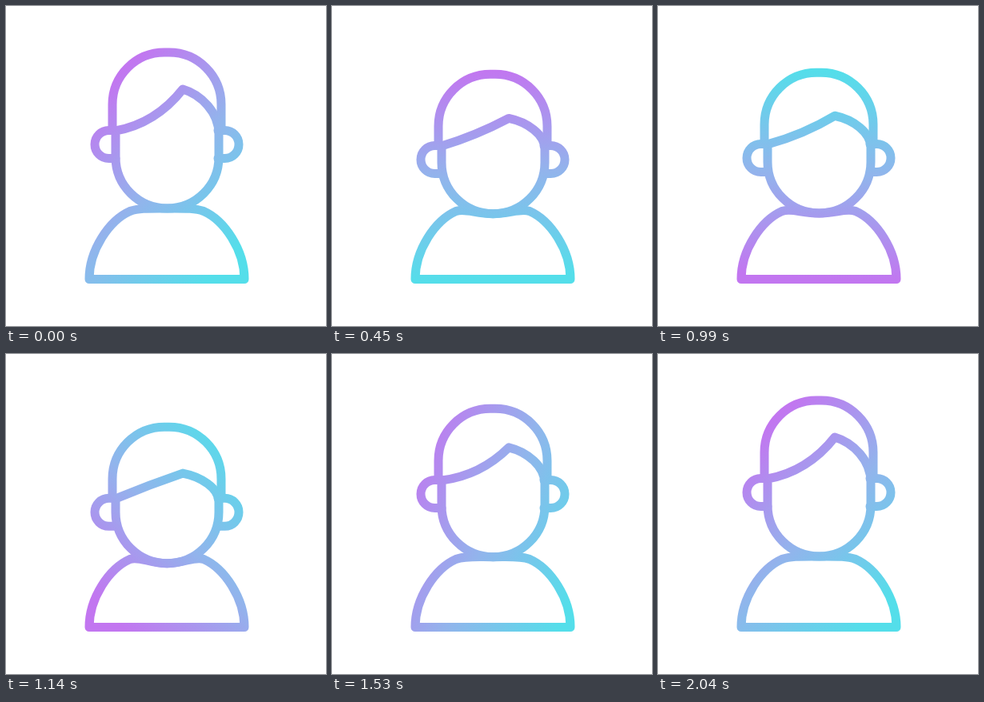
An HTML page for the animation above (4.07 s loop, 400 px wide and 400 px high).

```html
<!DOCTYPE html>
<html lang="en">
<head>
<meta charset="utf-8">
<title>Avatar</title>
<style>
  html, body { margin: 0; width: 100%; height: 100%; overflow: hidden; background: #fff; }
  svg { display: block; width: 100vw; height: 100vh; }
</style>
</head>
<body>
<svg viewBox="0 0 400 400">
  <defs>
    <linearGradient id="tint" gradientUnits="userSpaceOnUse">
      <stop offset="0" stop-color="#c276f0"/>
      <stop offset="0.5" stop-color="#92b4ec"/>
      <stop offset="1" stop-color="#54deea"/>
    </linearGradient>
  </defs>
  <g fill="none" stroke="url(#tint)" stroke-width="11" stroke-linecap="round" stroke-linejoin="round">
    <path id="body"/>
    <path id="ears"/>
    <path id="hair"/>
    <path id="face"/>
  </g>
</svg>
<script>
const LOOP = 4070, MOVE = 2040, STEP = 30;
const el = id => document.getElementById(id);
const [tint, body, ears, hair, face] = ['tint', 'body', 'ears', 'hair', 'face'].map(el);

// Two nods: [time, how far the head sinks]
const nods = [[0, 0], [190, -0.06], [600, 0.95], [990, 0.6], [1300, 1], [1670, -0.1], [MOVE, 0]];

const easeSine = u => (1 - Math.cos(Math.PI * u)) / 2;
const smoother = u => u * u * u * (10 - 15 * u + 6 * u * u);

function sinkAt(t) {
  const i = nods.findIndex(n => n[0] > t);
  if (i < 0) return 0;
  const [t0, a] = nods[i - 1], [t1, b] = nods[i];
  return a + (b - a) * easeSine((t - t0) / (t1 - t0));
}

// One full turn, fastest a little before the middle
function angleAt(t) {
  const u = Math.min(t / MOVE, 1);
  return Math.PI / 4 + 2 * Math.PI * smoother(u + 1.4 * (u * (1 - u)) ** 2);
}

function drawHead(d) {
  const top = 58 + 42 * d;
  const ear = Math.max(173, top + 106.7);
  const peak = 104 + 50 * d + 9 * d * d;
  const bend = 1 - 0.3 * d - 1.35 * d * d;
  const chin = 253 + 0.35 * (ear - 173);
  const side = ear - 17, end = ear - 13, rise = end - peak;

  body.setAttribute('d',
    `M104 341.5C104 305 129 268 155 256.5C166 252.5 180 ${chin} 201 ${chin}` +
    `C222 ${chin} 236 252.5 247 256.5C273 268 298 305 298 341.5Z`);

  ears.setAttribute('d',
    `M137 ${ear - 17.5}H128.5a17.5 17.5 0 0 0 0 35H137` +
    `M265 ${ear - 17.5}H273.5a17.5 17.5 0 0 1 0 35H265`);

  hair.setAttribute('d',
    `M133 ${side - 1}V${top + 65}a65 65 0 0 1 65 -65h6a65 65 0 0 1 65 65V${side - 1}`);

  face.setAttribute('d',
    `M137 ${side}V${chin - 64}A64.5 64 0 0 0 266 ${chin - 64}V${end}` +
    `C266 ${end - 0.48 * rise} 244 ${peak + 0.12 * rise} 221 ${peak}` +
    `Q${179 + 8 * bend} ${(side + peak) / 2 + 17 * bend} 137 ${side}Z`);
}

function turnTint(a) {
  const dx = 130 * Math.cos(a), dy = 130 * Math.sin(a);
  const ends = { x1: 201 - dx, y1: 210 - dy, x2: 201 + dx, y2: 210 + dy };
  for (const k in ends) tint.setAttribute(k, ends[k]);
}

const start = performance.now();
function tick() {
  const now = (performance.now() - start) % LOOP;
  const t = Math.floor(now / STEP) * STEP;
  drawHead(sinkAt(t));
  turnTint(angleAt(t));
  requestAnimationFrame(tick);
}
tick();
</script>
</body>
</html>
```
